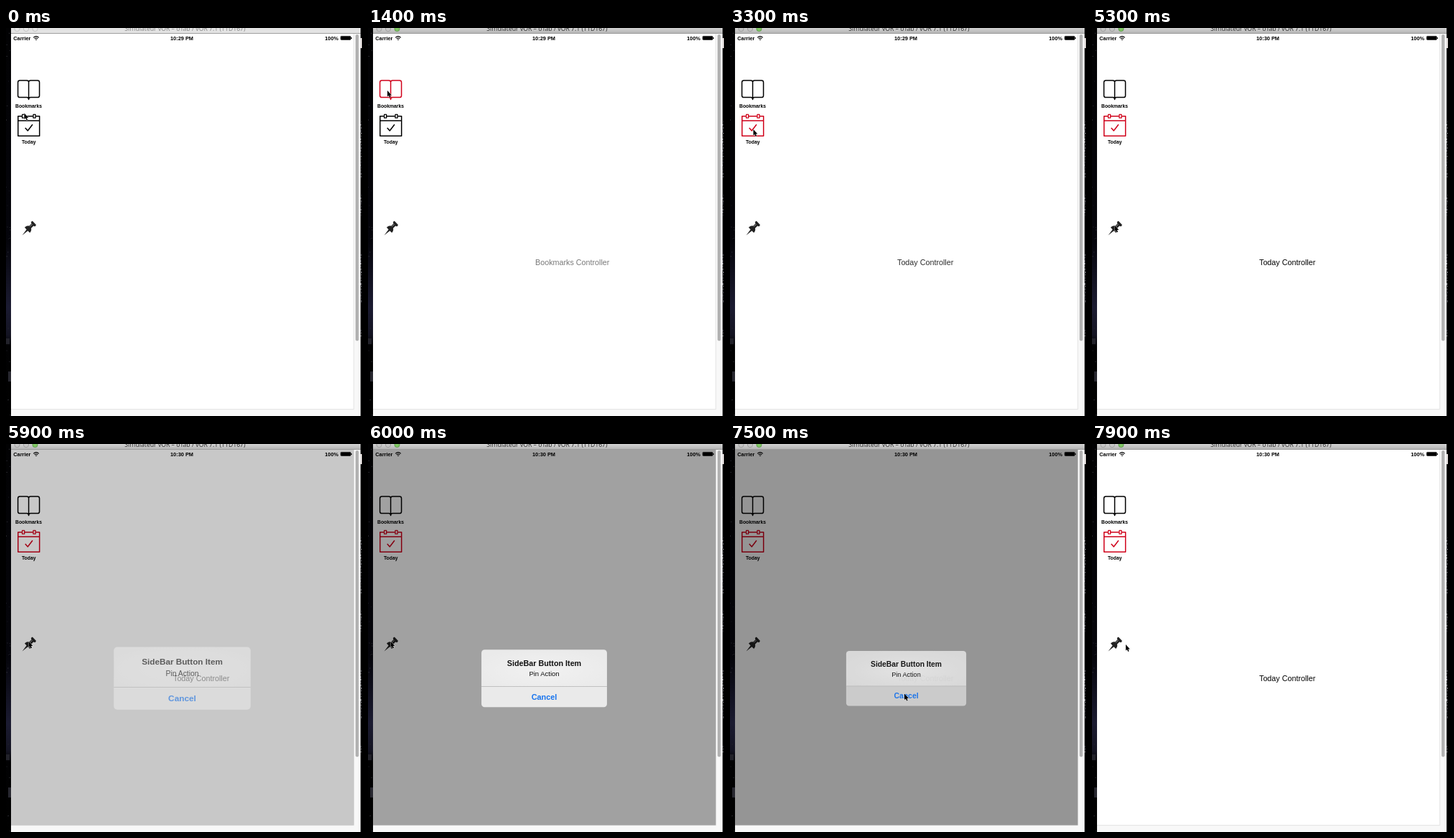
These frames come from a looping animation (496x540 px, 8 s). An HTML page:

```html
<!DOCTYPE html>
<html lang="en">
<head>
<meta charset="utf-8">
<title>Sidebar demo</title>
<style>
  html, body { margin: 0; width: 100%; height: 100%; overflow: hidden; background: #000; }
  svg { display: block; width: 496px; height: 540px; }
  text { font-family: "Liberation Sans", Arial, sans-serif; }
  .mid { text-anchor: middle; }
  .status { font-size: 7.4px; font-weight: bold; }
  .label { font-size: 6.8px; font-weight: bold; text-anchor: middle; }
  .page { font-size: 10.75px; }
  .icon { fill: none; stroke-width: 1.5; stroke-linejoin: round; }
</style>
</head>
<body>
<svg viewBox="0 0 496 540" width="496" height="540">
  <defs>
    <linearGradient id="night" x1="0" y1="0" x2="0" y2="1">
      <stop offset="0" stop-color="#020203"/>
      <stop offset=".55" stop-color="#05050b"/>
      <stop offset=".72" stop-color="#1b1b31"/>
      <stop offset=".79" stop-color="#141422"/>
      <stop offset=".82" stop-color="#020203"/>
      <stop offset="1" stop-color="#000"/>
    </linearGradient>
    <linearGradient id="bar" x1="0" y1="0" x2="0" y2="1">
      <stop offset="0" stop-color="#d2d2d2"/>
      <stop offset="1" stop-color="#b4b4b4"/>
    </linearGradient>
    <radialGradient id="shine" cx=".5" cy=".55" r=".6">
      <stop offset="0" stop-color="#fff" stop-opacity=".35"/>
      <stop offset="1" stop-color="#fff" stop-opacity="0"/>
    </radialGradient>
    <clipPath id="round"><rect x="-83.7" y="-38.3" width="167.4" height="76.6" rx="4.3"/></clipPath>
  </defs>

  <rect width="496" height="540" fill="#000"/>
  <rect width="7" height="540" fill="url(#night)"/>
  <g id="specks"></g>
  <rect x="494" y="14" width="2" height="14" fill="#d9d4d2"/>

  <!-- window -->
  <rect x="7" y="0" width="487" height="540" fill="#f8f8f8"/>
  <rect id="titleBar" x="7" y="0" width="487" height="7.5"/>
  <rect x="7" y="7.2" width="487" height=".8" fill="#8c8c8c"/>
  <g id="lights" stroke-width=".7">
    <circle cx="15.5" cy="1" r="3.6"/><circle cx="28" cy="1" r="3.6"/><circle cx="40.5" cy="1" r="3.6"/>
  </g>
  <text id="title" class="mid" x="249.5" y="4" style="font:8.64px 'Noto Sans',sans-serif">Simulateur vOR – oTab / vOR 7.1 (11D167)</text>
  <rect x="7" y="8" width="477.5" height="522.5" fill="#fff"/>
  <path d="M484.7 8V530.7H7" fill="none" stroke="#dcdcdc" stroke-width=".8"/>
  <rect x="487" y="9" width="4.4" height="426.5" rx="2.2" fill="#b2b2b2"/>

  <!-- status bar -->
  <text class="status" x="10.2" y="17">Carrier</text>
  <g fill="none" stroke="#000" stroke-width="1.15">
    <path d="M38.2 13.3Q42 9.8 45.8 13.3M39.8 15Q42 13 44.2 15"/>
    <circle cx="42" cy="16.3" r=".5" fill="#000" stroke-width=".6"/>
  </g>
  <text id="clock" class="status mid" x="245" y="17"></text>
  <text class="status" x="444.2" y="17">100%</text>
  <rect x="466.3" y="11.4" width="14" height="5" rx="1" stroke="#000" stroke-width=".6"/>
  <rect x="481" y="12.9" width="1" height="2" rx=".5"/>

  <!-- sidebar -->
  <g id="book" class="icon">
    <path d="M31.6 97.2V75.5Q31.6 73 29 73H19.3Q16.6 73 16.6 75.7V94Q16.6 96.6 19.3 96.6H29Q31.6 96.6 31.6 99.6Q31.6 96.6 34.2 96.6H44Q46.6 96.6 46.6 94V75.7Q46.6 73 44 73H34.2Q31.6 73 31.6 75.5"/>
  </g>
  <text class="label" x="31.5" y="111">Bookmarks</text>
  <g id="day" class="icon">
    <path d="M22.5 122.8H16.8V150.3H46.7V122.8H41.2M25.8 122.8H37.9M16.8 129H46.7"/>
    <path d="M22.6 120.3H25.7V125.2H22.6ZM38 120.3H41.1V125.2H38Z" stroke-width="1.3"/>
    <path d="M26.8 139L30.3 143L37 134.2"/>
  </g>
  <text class="label" x="31.7" y="161">Today</text>
  <path fill="#222" d="M22.6 288.4L28.6 280.6L26 277.6Q29 274.6 32.3 275.5L35.5 272.2L34.8 270L36.8 268.6L42 274L40.6 276.2L38.2 275.4L35 278.8Q36 282 33.2 285L30.4 282.2Z"/>
  <path d="M33.3 276.4L36.6 273.1" stroke="#bbb" stroke-width=".8"/>

  <!-- pages -->
  <text id="pageBook" class="page" x="233" y="330">Bookmarks Controller</text>
  <text id="pageDay" class="page" x="233" y="330">Today Controller</text>

  <!-- alert -->
  <rect id="dim" x="7" y="8" width="477.5" height="522.5"/>
  <g id="alert">
    <g clip-path="url(#round)">
      <rect id="panel" x="-84" y="-39" width="168" height="78"/>
      <rect x="-84" y="-39" width="168" height="50" fill="url(#shine)"/>
      <rect id="press" x="-84" y="10.8" width="168" height="28" fill-opacity=".06"/>
      <rect x="-84" y="10.4" width="168" height=".7" fill="#b3b3b3"/>
    </g>
    <text class="mid" y="-16.7" font-size="10.3" font-weight="bold" fill="#111">SideBar Button Item</text>
    <text class="mid" y="-2.7" font-size="9.1" fill="#111">Pin Action</text>
    <text class="mid" y="28.1" font-size="10.4" font-weight="bold" fill="#1673ee">Cancel</text>
  </g>

  <path id="cursor" d="M0 0V8.6L1.9 6.9L3.2 9.9L4.6 9.3L3.4 6.4H5.9Z" stroke="#fff" stroke-width=".7" paint-order="stroke"/>
</svg>
<script>
const LOOP = 8000, STEP = 100;
const $ = id => document.getElementById(id);
const set = (el, attrs) => { for (const k in attrs) el.setAttribute(k, attrs[k]); };
const ramp = (t, from, len) => Math.min(1, Math.max(0, (t - from) / len));
const smooth = u => u * u * (3 - 2 * u);
const easeOut = u => 1 - (1 - u) ** 3;

// cursor tip: time, x, y
const path = [
  [200, 25.5, 118.5], [500, 27, 87], [1450, 27, 87], [1600, 27, 119],
  [2300, 32.5, 141], [4900, 32.5, 141], [5100, 40, 213], [5300, 31.5, 274.5],
  [6400, 31.5, 274.5], [6700, 175, 345], [6800, 318, 362], [7000, 243, 347.5],
  [7600, 243, 347.5], [7900, 47, 279]
];

function tip(t) {
  const i = path.findIndex(p => p[0] > t);
  if (i < 0) return path[path.length - 1].slice(1);
  if (i === 0) return path[0].slice(1);
  const [t0, x0, y0] = path[i - 1], [t1, x1, y1] = path[i];
  const u = (t - t0) / (t1 - t0);
  return [x0 + (x1 - x0) * u, y0 + (y1 - y0) * u];
}

function scatter() {
  let seed = 17;
  const rnd = () => (seed = seed * 16807 % 2147483647) / 2147483647;
  const dot = (x, y, w, h, v) => {
    const r = document.createElementNS("http://www.w3.org/2000/svg", "rect");
    set(r, { x, y, width: w, height: h, fill: `rgb(${v},${v},${v + 8})` });
    $("specks").append(r);
  };
  for (let i = 0; i < 26; i++) dot(rnd() * 6, rnd() * 540, 1, 1, 25 + rnd() * 45 | 0);
  for (const [from, to] of [[130, 210], [232, 262], [315, 380], [420, 432]])
    for (let y = from; y < to; y += 4) dot(494 + rnd(), y, 1, 1 + rnd() * 2, 60 + rnd() * 130 | 0);
  dot(0, 432, 5, 8, 34);
  dot(3, 478, 4, 14, 40);
}

function draw(t) {
  const active = t >= 800, onDay = t >= 2500, onBook = active && !onDay;
  set($("titleBar"), { fill: active ? "url(#bar)" : "#e3e3e3" });
  set($("title"), { fill: active ? "#333" : "#8a8a8a" });
  [...$("lights").children].forEach((c, i) => set(c, {
    fill: !active ? "#e8e8e8" : i === 2 ? "#7fc763" : "#c6c6c6",
    stroke: !active ? "#b5b5b5" : i === 2 ? "#4d8a3c" : "#8f8f8f"
  }));
  $("clock").textContent = t < 5000 ? "10:29 PM" : "10:30 PM";
  set($("book"), { stroke: onBook ? "#d0021b" : "#000" });
  set($("day"), { stroke: onDay ? "#d0021b" : "#000" });
  set($("pageBook"), { opacity: smooth(ramp(t, 880, 1000)) * (1 - ramp(t, 2500, 600)) });
  set($("pageDay"), { opacity: smooth(ramp(t, 2560, 1000)) });

  const shown = easeOut(ramp(t, 5820, 400));
  const left = 1 - smooth(ramp(t, 7450, 350));
  const grey = Math.round(234 - 14 * ramp(t, 6000, 600));
  set($("dim"), { "fill-opacity": .44 * shown * left });
  set($("alert"), {
    opacity: Math.min(1, shown * 1.2) * left,
    transform: `translate(245.5 326.2) scale(${1.27 - .27 * shown})`
  });
  set($("panel"), { fill: `rgb(${grey},${grey},${grey})` });
  set($("press"), { visibility: t >= 7300 ? "inherit" : "hidden" });

  set($("cursor"), { transform: `translate(${tip(t)})` });
}

function tick() {
  const t = performance.now() % LOOP;
  draw(Math.floor(t / STEP) * STEP);
  requestAnimationFrame(tick);
}

scatter();
tick();
</script>
</body>
</html>
```
